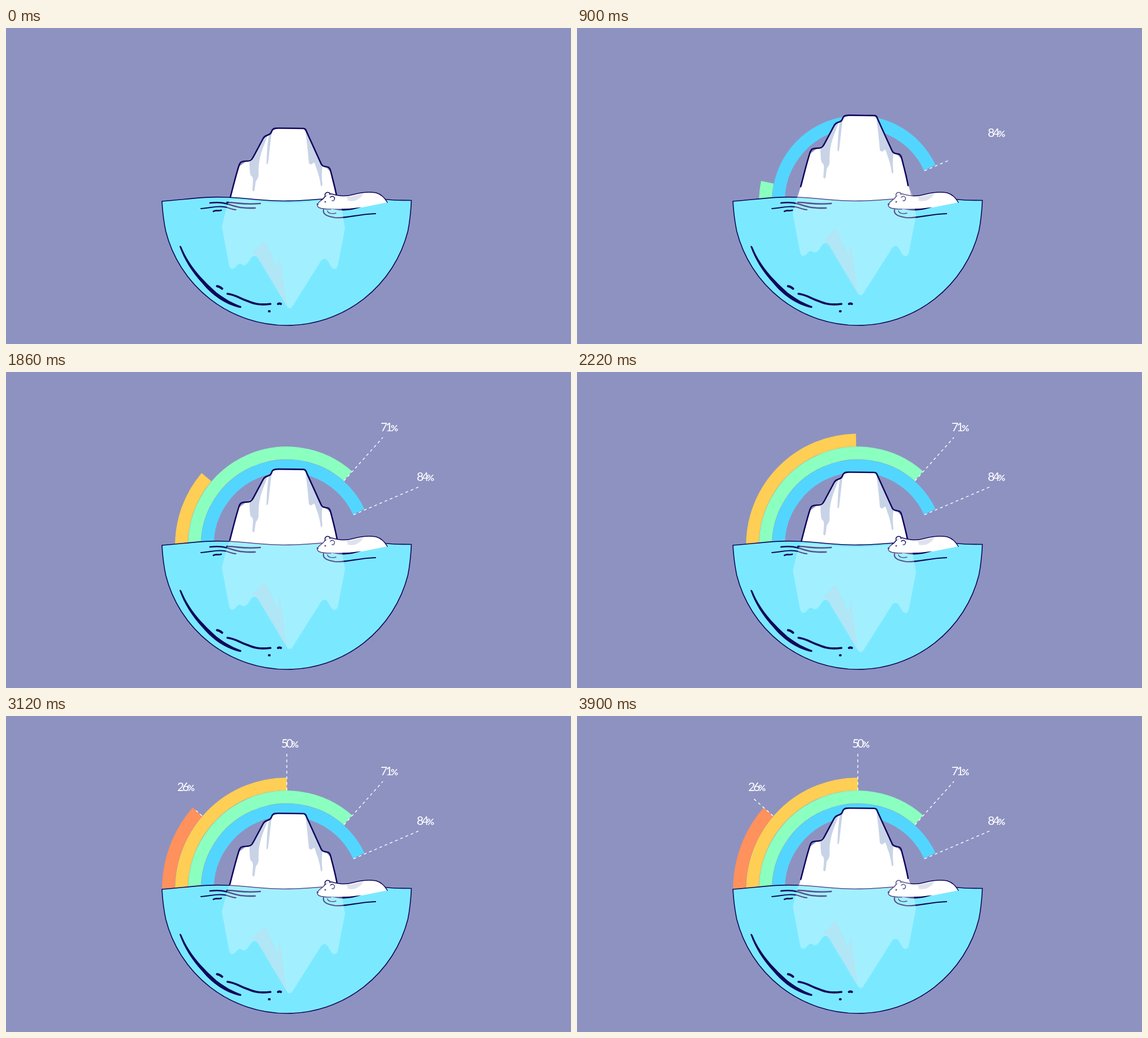
Recreate the animation shown at these times as an HTML page. Size 1000 by 560 pixels, loop 4 s.

```html
<!DOCTYPE html>
<html lang="en">
<head>
<meta charset="utf-8">
<title>Iceberg chart</title>
<style>
  html, body { margin: 0; width: 100%; height: 100%; overflow: hidden; background: #8e92c1; }
  svg { display: block; width: 100%; height: 100%; }
  .ink { fill: none; stroke: #10065c; stroke-linecap: round; stroke-linejoin: round; }
  .solid { fill: #10065c; }
  .ring { fill: none; stroke-width: 22.6; }
  .lead { stroke: #fff; stroke-width: 1.4; stroke-dasharray: 5 5; }
  text { font: 400 21px Lato, "Open Sans", sans-serif; letter-spacing: -3.2px; fill: #fff; }
  text tspan { font-size: 16px; font-weight: 700; }
</style>
</head>
<body>
<svg viewBox="0 0 1000 560">
  <rect width="1000" height="560" fill="#8e92c1"/>
  <g id="chart"></g>

  <g class="berg">
    <path fill="#fff" d="M396 304L382 352L600 355L587 303L575 256L567 247L557 240L533 187L526 178L482 178L472 181L465 190L455 196L438 229L424 237L412 246Z"/>
    <g fill="#c8d3e7">
      <path d="M463 191L455 196L438 229Q435 235 431 236Q431 256 433 261Q438 264 437 272L436 287Q438 292 440 287L442 272Q448 264 447 258Q446 235 455 212Z"/>
      <path d="M465 190L470 186L464 238Q462 244 461 240Q462 208 465 190Z"/>
      <path d="M530 183L533 187L557 240L560 245Q558 263 560 277Q559 283 557 279Q555 262 549 248Q546 235 543 240Q539 244 536 239Q534 213 530 183Z"/>
    </g>
    <path class="ink" stroke-width="2.6" d="M396 304C402 281 406 264 412 245C414 237 418 236 424 236C432 236 435 234 438 228L455 196C458 190 461 191 465 189C471 187 469 183 472 180C474 177.500 477 177.500 482 177.500L526 178C531 178 531 182 533 186L557 239C559 245 563 245 567 246C573 246 574 251 575 255C579 271 583 285 586 302"/>
  </g>

  <path class="ink" style="fill:#7ae9ff" stroke-width="1.6" d="M276 307C318 304 350 298 392 300C435 302 455 306.500 492 306.500C530 306.500 555 302 590 302C630 302 660 304 675 304C690 306 704 305 717.500 305.500C716.500 325 715 342 711.300 360A221 221 0 0 1 282.700 360C279 342 277 325 276 307Z"/>

  <g class="ink" stroke-width="2.6">
    <path d="M361 310C386 307 392 313 410 317C422 320 430 319 441 319"/>
    <path stroke-width="1.9" d="M345 320C362 319 372 315 386 317C394 318 399 322 407 322"/>
    <path d="M391 309C410 309 418 314 450 311"/>
    <path d="M367 325C371 322 375 325 381 323"/>
    <path stroke-width="4" d="M373.500 457.500Q378 458 382.500 462"/>
    <path stroke-width="4" d="M481.500 489Q484 487.500 486.500 489M465.500 502L466.500 502"/>
    <path stroke-width="3.600" d="M392 471C405 472 415 480 428 484C442 490 452 491 468 489"/>
  </g>
  <path class="solid" d="M307 387Q309 384 311 389C325 424 352 450 373 469C389 481 402 488 416 493Q418 496 414 496C388 490 365 474 347 452C329 432 316 412 307 387Z"/>

  <path fill="#fff" d="M551 314C552 308 558 306 562 302C565 297 570 294 576 294C591 298 601 299 615 295C630 291 643 290 655 292C665 295 671 302 675 309L630 318C608 321 590 322 575 321C562 321 551 320 551 314Z"/>
  <path fill="#dfe2ec" d="M600 300Q618 297 632 293Q630 301 618 306Q608 308 603 305Q609 303 600 300Z"/>
  <g class="ink" stroke-width="1.5">
    <path d="M675 309C671 302 665 295 655 292C643 290 630 291 615 295C601 299 591 298 576 294C570 294 565 297 562 302C558 306 552 308 551 314C551 320 562 321 575 321"/>
    <path style="fill:#fff" d="M565 298C563 293 568 290 572 292Q574 293 573 295"/>
    <path d="M574 300C578 296 583 300 581 304Q580 307 577 306"/>
    <path stroke-width="2.200" d="M562 322C560 331 570 334 582 336C600 338 622 330 654 329"/>
    <path d="M569 324C570 329 578 330 584 328"/>
  </g>
  <circle class="solid" cx="565" cy="308" r="1.5"/>
  <ellipse class="solid" cx="551.500" cy="312.500" rx="1.600" ry="2"/>
  <path class="solid" d="M572 320Q600 322 629 317.500Q607 325 590 323Z"/>

  <g class="berg">
    <path fill="#fff" fill-opacity=".3" d="M396 304C430 303 455 310 495 310C530 310 555 305 587 303L594 320L600 355L587 422Q583 431 576 424L569 412Q564 406 558 412L507 493Q502 500 497 493L446 408Q440 400 434 407L428 416Q422 423 417 419Q412 415 406 424Q398 431 395 421L382 352L390 320Z"/>
    <path fill="#c7d2e4" fill-opacity=".36" d="M434 399Q446 390 454 380Q458 376 461 382L476 415Q481 430 482 421L484 401L488 425L497 493L446 408Q441 400 434 399Z"/>
  </g>
</svg>
<script>
const LOOP = 4000, STEP = 60;
const CX = 497, CY = 307;
const NS = 'http://www.w3.org/2000/svg';
const chart = document.getElementById('chart');
const bergs = document.querySelectorAll('.berg');

// sweep is in degrees from the left horizon; line runs from ring end to label
const bars = [
  { value: 84, color: '#52d6ff', r: 140.5, sweep: 155,   start: 65,   label: 780,  lead: 780,  line: [615, 253, 732, 203], text: [727, 193] },
  { value: 71, color: '#8bffc0', r: 163.5, sweep: 131.4, start: 840,  label: 1500, lead: 1510, line: [598, 193, 667, 116], text: [663, 105] },
  { value: 50, color: '#ffce54', r: 186.5, sweep: 90,    start: 1562, label: 2250, lead: 2250, line: [497, 132, 497, 65],  text: [487, 56] },
  { value: 26, color: '#ff915c', r: 209.5, sweep: 41,    start: 2295, label: 2990, lead: 3020, line: [347, 177, 311, 145], text: [303, 133] }
];
const GROW = 665, LEAD = 335;

const clamp = x => Math.max(0, Math.min(1, x));
const swing = x => (1 - Math.cos(Math.PI * x)) / 2;

function add(tag, attrs) {
  const node = document.createElementNS(NS, tag);
  for (const key in attrs) node.setAttribute(key, attrs[key]);
  return chart.appendChild(node);
}

for (const b of bars) b.ring = add('path', { class: 'ring', stroke: b.color });
for (const b of bars) {
  b.dash = add('line', { class: 'lead', x1: b.line[0], y1: b.line[1] });
  b.tag = add('text', { x: b.text[0], y: b.text[1] });
  b.tag.innerHTML = b.value + '<tspan>%</tspan>';
}

function arc(r, deg) {
  const a = deg * Math.PI / 180;
  const x = CX - r * Math.cos(a), y = CY - r * Math.sin(a);
  return `M${CX - r} ${CY}A${r} ${r} 0 0 1 ${x} ${y}`;
}

function show(node, on) {
  node.setAttribute('visibility', on ? 'visible' : 'hidden');
}

function lift(t) {
  return 24.8 * (t < 2200 ? swing(t / 1100) : swing((t - 2200) / 3100));
}

function draw(t) {
  for (const b of bars) {
    const grow = clamp((t - b.start) / GROW);
    show(b.ring, grow > 0);
    b.ring.setAttribute('d', arc(b.r, b.sweep * grow));

    const k = clamp((t - b.lead) / LEAD);
    const [x1, y1, x2, y2] = b.line;
    show(b.dash, k > 0);
    b.dash.setAttribute('x2', x1 + (x2 - x1) * k);
    b.dash.setAttribute('y2', y1 + (y2 - y1) * k);

    show(b.tag, t >= b.label);
  }
  for (const g of bergs) g.setAttribute('transform', `translate(0 ${-lift(t)})`);
}

const begin = performance.now();
function tick() {
  const t = (performance.now() - begin) % LOOP;
  draw(Math.min(3900, Math.floor(t / STEP) * STEP));
  requestAnimationFrame(tick);
}
draw(0);
requestAnimationFrame(tick);
</script>
</body>
</html>
```
